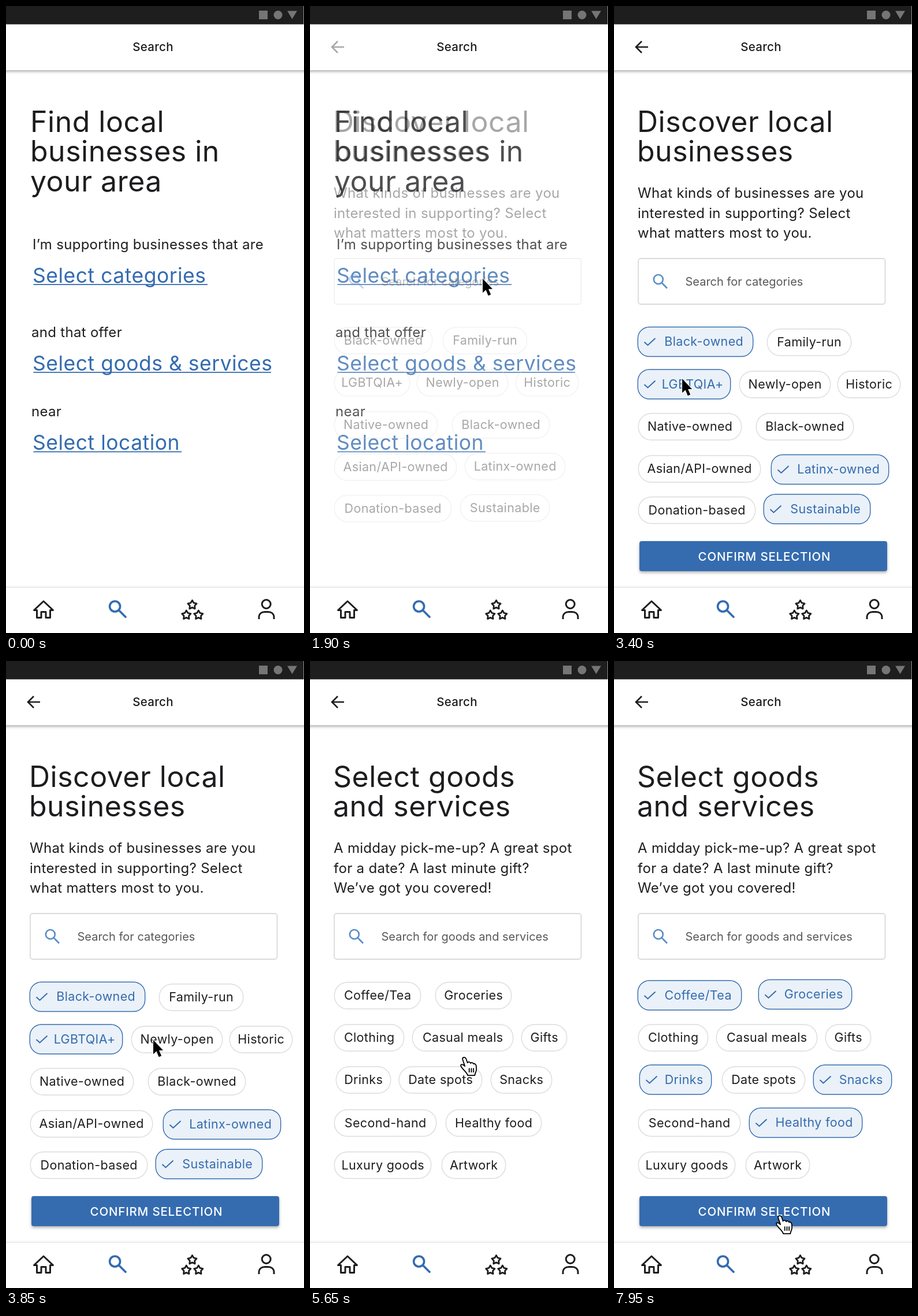
These frames come from a looping animation (516 by 1085 pixels, 8 s). An HTML page:

```html
<!DOCTYPE html>
<html lang="en">
<head>
<meta charset="utf-8">
<title>Local business search</title>
<style>
  html, body { margin: 0; width: 100%; height: 100%; overflow: hidden; background: #fff; }
  svg { display: block; width: 100%; height: 100%; }
  text { font-family: Inter, "Open Sans", sans-serif; font-optical-sizing: none; fill: #1d1d1f; white-space: pre; }
  .bar { font-size: 20.5px; font-weight: 500; letter-spacing: .3px; }
  .title { font-size: 50px; letter-spacing: .5px; }
  .body { font-size: 24px; letter-spacing: .3px; }
  .link { font-size: 35.5px; letter-spacing: .5px; fill: #346cb0; }
  .hint { font-size: 20px; fill: #58585a; }
  .chip { font-size: 21.5px; letter-spacing: .35px; }
  .on { fill: #346cb0; }
  .cta { font-size: 20.5px; font-weight: 500; letter-spacing: .8px; fill: #fff; }
  .mid { text-anchor: middle; }
  .line { fill: none; stroke: #1d1d1f; stroke-width: 3; stroke-linejoin: round; }
</style>
</head>
<body>
<svg id="stage" viewBox="0 0 516 1085" preserveAspectRatio="none" xmlns="http://www.w3.org/2000/svg">
  <defs>
    <filter id="soft" x="-10%" y="-30%" width="120%" height="170%">
      <feDropShadow dx="0" dy="2.5" stdDeviation="2.4" flood-color="#000" flood-opacity=".32"/>
    </filter>
    <filter id="lift" x="-10%" y="-30%" width="120%" height="170%">
      <feDropShadow dx="0" dy="-1" stdDeviation="2" flood-color="#000" flood-opacity=".14"/>
    </filter>
  </defs>
  <rect width="516" height="1085" fill="#fff"/>
  <g id="pages"></g>

  <rect x="-10" y="20" width="536" height="91" fill="#fff" filter="url(#soft)"/>
  <rect width="515.5" height="31.7" fill="#1e1e1e"/>
  <g fill="#757575">
    <rect x="438" y="8" width="15" height="15"/>
    <circle cx="471" cy="15.5" r="7.5"/>
    <path d="M487 8.5H504L495.5 22.5Z"/>
  </g>
  <text class="bar mid" x="254.5" y="78">Search</text>
  <path id="back" class="line" style="stroke-width:2.6;stroke-linejoin:miter" d="M59 71H38M48 61L38 71L48 81"/>

  <rect x="-10" y="1007" width="536" height="90" fill="#fff" filter="url(#lift)"/>
  <path class="line" d="M48.5 1045.5L65 1030L81.5 1045.5H76.5V1058.5H69V1048.5H61V1058.5H53.5V1045.5Z"/>
  <g class="line" style="stroke:#346cb0;stroke-width:3.6">
    <circle cx="188.6" cy="1039" r="9"/>
    <path d="M195.200 1045.500L208 1058.200"/>
  </g>
  <g id="stars" class="line" style="stroke-width:2.8"></g>
  <g class="line">
    <circle cx="450.700" cy="1035" r="7.500"/>
    <path d="M438 1061V1058C438 1051.500 442.500 1048.500 448 1048.500H454C459.500 1048.500 464 1051.500 464 1058V1061"/>
  </g>

  <g id="cursor">
    <path id="arrow" transform="translate(0 .8)" d="M0 0V24.500L5.500 19.500L9.700 29.500L14.200 27.500L10 18H17Z" fill="#000" stroke="#fff" stroke-width="2" paint-order="stroke"/>
    <g id="hand" transform="translate(-.8 -.8)" stroke="#000" stroke-width="1.800" stroke-linejoin="round" stroke-linecap="round">
      <path fill="#fff" d="M-3 3C-3.500-1 1.500-1.500 3 2L5.500 9C6.500 7 10 7 11 10C12 8 15 8.500 16 11C17 10 20 11 20.500 14L21 20C21 24 19 26 18 31H6C5 27 1 24-3 19C-7 15-7 12-4 12C-2 12 0 14 1 15Z"/>
      <path fill="none" d="M8.500 19V25M12.300 19V25M16 19V25"/>
    </g>
  </g>
</svg>

<script>
const $ = id => document.getElementById(id);
const BLUE = "#346cb0";
const LOOP = 8000;

const text = (cls, x, y, s) => `<text class="${cls}" x="${x}" y="${y}">${s.replace("&", "&amp;")}</text>`;
const lines = (cls, x, y, step, list) => list.map((s, i) => text(cls, x, y + i * step, s)).join("");
const group = (id, inner) => `<g id="${id}">${inner}</g>`;

function link(y, width, label) {
  return text("link", 46, y, label) + `<rect x="47.5" y="${y + 2.5}" width="${width}" height="1.8" fill="${BLUE}"/>`;
}

function field(hint) {
  return `<rect x="42" y="437" width="427.5" height="79" rx="4" fill="none" stroke="#d0d0d2" stroke-width="1.4"/>
    <g fill="none" stroke="#5b8dc6" stroke-width="2.6"><circle cx="76.8" cy="473" r="8"/><path d="M82.7 479L92 488.5"/></g>` +
    text("hint", 123.5, 483.5, hint);
}

function chip(label, x, y, w, on) {
  const h = on ? 51 : 46;
  const left = on ? x + 46 : x, right = x + w - (on ? 17 : 0);
  const tick = on ? `<path d="M${x + 11.5} ${y + .5}l6 5.5l13-12" fill="none" stroke="${BLUE}" stroke-width="2"/>` : "";
  return `<rect x="${x + .3}" y="${y - h / 2}" width="${w - .6}" height="${h}" rx="${on ? 20 : 22.5}"
    fill="${on ? "#eaf1f8" : "none"}" stroke="${on ? BLUE : "#dcdcde"}" stroke-width="1.4"/>` +
    tick + text("chip mid" + (on ? " on" : ""), (left + right) / 2 + .2, y + 7, label);
}

// label, x, y, width, then shift x, shift y and chosen flag for the second state
const kinds = [
  ["Black-owned", 42, 579, 170, -1, 2, 1], ["Family-run", 230, 579, 146, 35, 3],
  ["LGBTQIA+", 42, 652, 131, -1, 2.5, 1], ["Newly-open", 185, 652, 158, 32, 3], ["Historic", 356, 652, 109, 31, 3],
  ["Native-owned", 42, 725, 179, 0, 3], ["Black-owned", 246, 725, 169, 0, 3],
  ["Asian/API-owned", 42, 798, 212, 0, 3], ["Latinx-owned", 268, 797, 174, 4, 5, 1],
  ["Donation-based", 42, 869.5, 203, 0, 3], ["Sustainable", 260, 868.5, 155, -1, 2, 1]
];
const goods = [
  ["Coffee/Tea", 42, 579, 150, -1, -.5, 1], ["Groceries", 217, 579, 132, 33, -2, 1],
  ["Clothing", 42, 652, 121], ["Casual meals", 177, 652, 175], ["Gifts", 366, 652, 79],
  ["Drinks", 45, 725, 95, -1, -.5, 1], ["Date spots", 154, 725, 144, 33], ["Snacks", 313, 725, 106, 32, -.5, 1],
  ["Second-hand", 42, 799.5, 177], ["Healthy food", 235, 799.5, 166, -1, -.5, 1],
  ["Luxury goods", 42, 872.5, 168], ["Artwork", 228, 872.5, 111]
];
const plain = list => list.map(([s, x, y, w]) => chip(s, x, y, w)).join("");
const chosen = list => list.map(([s, x, y, w, dx = 0, dy = 0, on]) => chip(s, x + dx, y + dy, w + (on ? 30 : 0), on)).join("");

const button = `<rect x="44" y="926" width="429" height="52" rx="4" fill="${BLUE}" filter="url(#soft)"/>` +
  text("cta mid", 260.5, 959.5, "CONFIRM SELECTION");

function picker(id, title, intro, hint, list) {
  return group(id, lines("title", 40, 217.5, 51.5, title) + lines("body", 41, 332, 34.5, intro) + field(hint) +
    group(id + "Off", plain(list)) + group(id + "On", chosen(list) + button));
}

$("pages").innerHTML =
  group("find",
    lines("title", 42, 217.5, 51.5, ["Find local", "businesses in", "your area"]) +
    text("body", 46, 421, "I’m supporting businesses that are") + link(478.5, 301.5, "Select categories") +
    text("body", 44, 573, "and that offer") + link(630.5, 411.5, "Select goods & services") +
    text("body", 44, 710, "near") + link(768, 256.5, "Select location")) +
  picker("kinds", ["Discover local", "businesses"],
    ["What kinds of businesses are you", "interested in supporting? Select", "what matters most to you."],
    "Search for categories", kinds) +
  picker("goods", ["Select goods", "and services"],
    ["A midday pick-me-up? A great spot", "for a date? A last minute gift?", "We’ve got you covered!"],
    "Search for goods and services", goods);

function star(cx, cy) {
  const pts = Array.from({ length: 10 }, (_, i) => {
    const r = i % 2 ? 4.4 : 8, a = i * Math.PI / 5;
    return (cx + r * Math.sin(a)).toFixed(1) + "," + (cy - r * Math.cos(a)).toFixed(1);
  });
  return `<polygon points="${pts.join(" ")}"/>`;
}
$("stars").innerHTML = star(322.5, 1036.5) + star(312.3, 1054) + star(333.3, 1054);

const clamp = u => Math.max(0, Math.min(1, u));
const smooth = u => u * u * (3 - 2 * u);
const ramp = (t, a, b) => clamp((t - a) / (b - a));
const rise = u => 1 - (1 - u) ** 1.66;
const fall = u => 1 - u ** 1.1;

function show(id, alpha) {
  const el = $(id);
  el.style.display = alpha > 0 ? "" : "none";
  el.setAttribute("opacity", alpha);
}

// time, x, y of the pointer tip
const path = [
  [600, 530, 780], [1200, 299, 471], [2350, 299, 471], [2800, 114, 644],
  [3350, 114, 644], [3850, 255, 655], [4450, 288, 961], [5350, 288, 961],
  [5650, 268, 687], [6250, 159, 582], [7350, 159, 582], [7900, 288, 961]
];
const overLink = [[1100, 1650], [2500, 3000], [4300, 5050], [5600, 6550], [7700, LOOP]];

function pointer(t) {
  const i = path.findIndex(k => k[0] > t);
  if (i < 0) return path[path.length - 1].slice(1);
  const a = path[Math.max(0, i - 1)], b = path[i];
  const u = smooth(ramp(t, a[0], b[0]));
  return [a[1] + (b[1] - a[1]) * u, a[2] + (b[2] - a[2]) * u];
}

function draw(t) {
  const toKinds = ramp(t, 1800, 2200), pickKinds = ramp(t, 2950, 3200);
  const toGoods = ramp(t, 5000, 5400), pickGoods = ramp(t, 6500, 6750);
  show("find", fall(toKinds));
  show("back", rise(toKinds));
  show("kinds", rise(toKinds) * fall(toGoods));
  show("kindsOff", fall(pickKinds));
  show("kindsOn", rise(pickKinds));
  show("goods", rise(toGoods));
  show("goodsOff", fall(pickGoods));
  show("goodsOn", rise(pickGoods));

  const hand = overLink.some(([a, b]) => t >= a && t < b);
  const [x, y] = pointer(t);
  show("cursor", t >= 600 ? 1 : 0);
  show("hand", hand ? 1 : 0);
  show("arrow", hand ? 0 : 1);
  $("cursor").setAttribute("transform", `translate(${x.toFixed(1)} ${y.toFixed(1)})`);
}

const start = performance.now();
function tick() {
  draw((performance.now() - start) % LOOP);
  requestAnimationFrame(tick);
}
draw(0);
requestAnimationFrame(tick);
</script>
</body>
</html>
```
